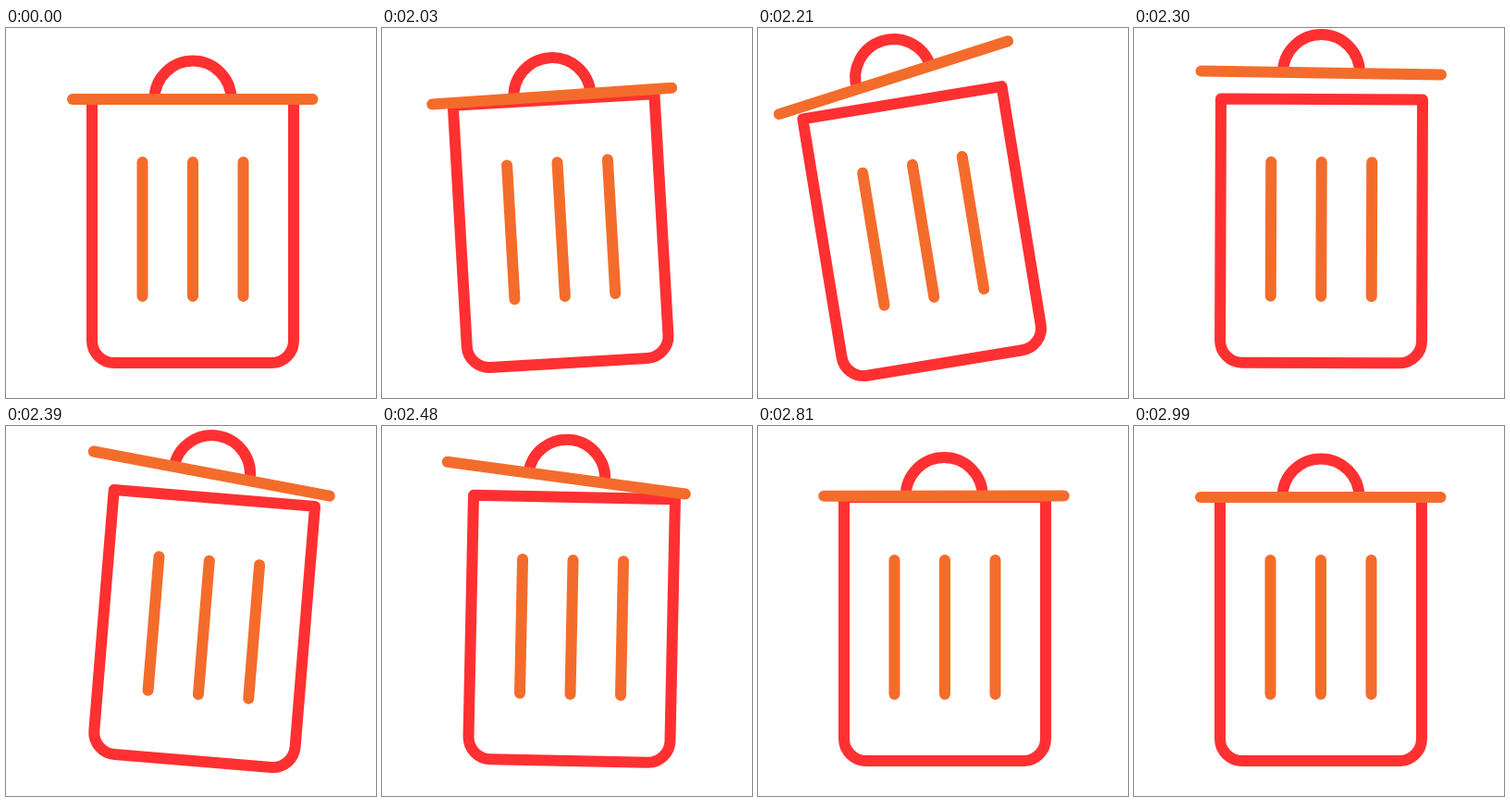
These frames come from a looping animation (400 by 400 pixels, 3.02 s). An HTML page:

```html
<!DOCTYPE html>
<html>
<head>
<meta charset="utf-8">
<style>
  html, body { margin: 0; width: 100%; height: 100%; overflow: hidden; background: #fff; }
  svg { display: block; width: 100vw; height: 100vh; }
  path { fill: none; stroke-width: 12; stroke-linejoin: round; }
  .red { stroke: #ff3031; }
  .orange { stroke: #f46c2b; stroke-linecap: round; }
</style>
</head>
<body>
<svg viewBox="0 0 400 400">
  <g id="bin">
    <path class="red" d="M93 77H311V338A24 24 0 0 1 287 362H117A24 24 0 0 1 93 338Z"/>
    <path class="orange" d="M147.5 145V290M202 145V290M256.5 145V290"/>
    <g id="lid">
      <path class="red" d="M160.5 77A41.5 41.5 0 0 1 243.5 77"/>
      <path class="orange" d="M72 77H331.5"/>
    </g>
  </g>
</svg>
<script>
const LOOP = 3020, REST = 2030, STEP = 30, KEY_STEPS = 3;

// Key poses, one every three steps; the lid moves relative to the bin
const binTilt = [-3.3, -8.1, -9.3, 0.2, 4.7, 1.2, 0];
const lidTilt = [-0.6, -4.5, -8.4, 0.7, 6, 6.5, 2, -0.1, -0.1, 0];
const lidX = [-1.4, -3.5, -4.7, -0.6, -5, -8.8, -5.6, -3, -1.4, -0.5, 0];
const lidY = [-4, -19, -28.3, -28.5, -26, -20.7, -11.8, -5.7, -2.5, -1, -0.3, 0];

const bin = document.getElementById('bin');
const lid = document.getElementById('lid');

// Catmull-Rom curve through the keys, zero outside them
function curve(keys, u) {
  const i = Math.floor(u), f = u - i;
  const [a, b, c, d] = [-1, 0, 1, 2].map(n => keys[i + n] ?? 0);
  return b + f / 2 * (c - a + f * (2 * a - 5 * b + 4 * c - d + f * (3 * (b - c) + d - a)));
}

function draw(now) {
  const t = now % LOOP;
  const u = t < REST ? Infinity : Math.floor((t - REST) / STEP) / KEY_STEPS;
  const at = keys => u === Infinity ? 0 : curve(keys, u);
  bin.setAttribute('transform', `rotate(${at(binTilt)} 202 362)`);
  lid.setAttribute('transform',
    `translate(${at(lidX)} ${at(lidY)}) rotate(${at(lidTilt)} 202 77)`);
}

const start = performance.now();
function tick() {
  draw(performance.now() - start);
  requestAnimationFrame(tick);
}
tick();
</script>
</body>
</html>
```
